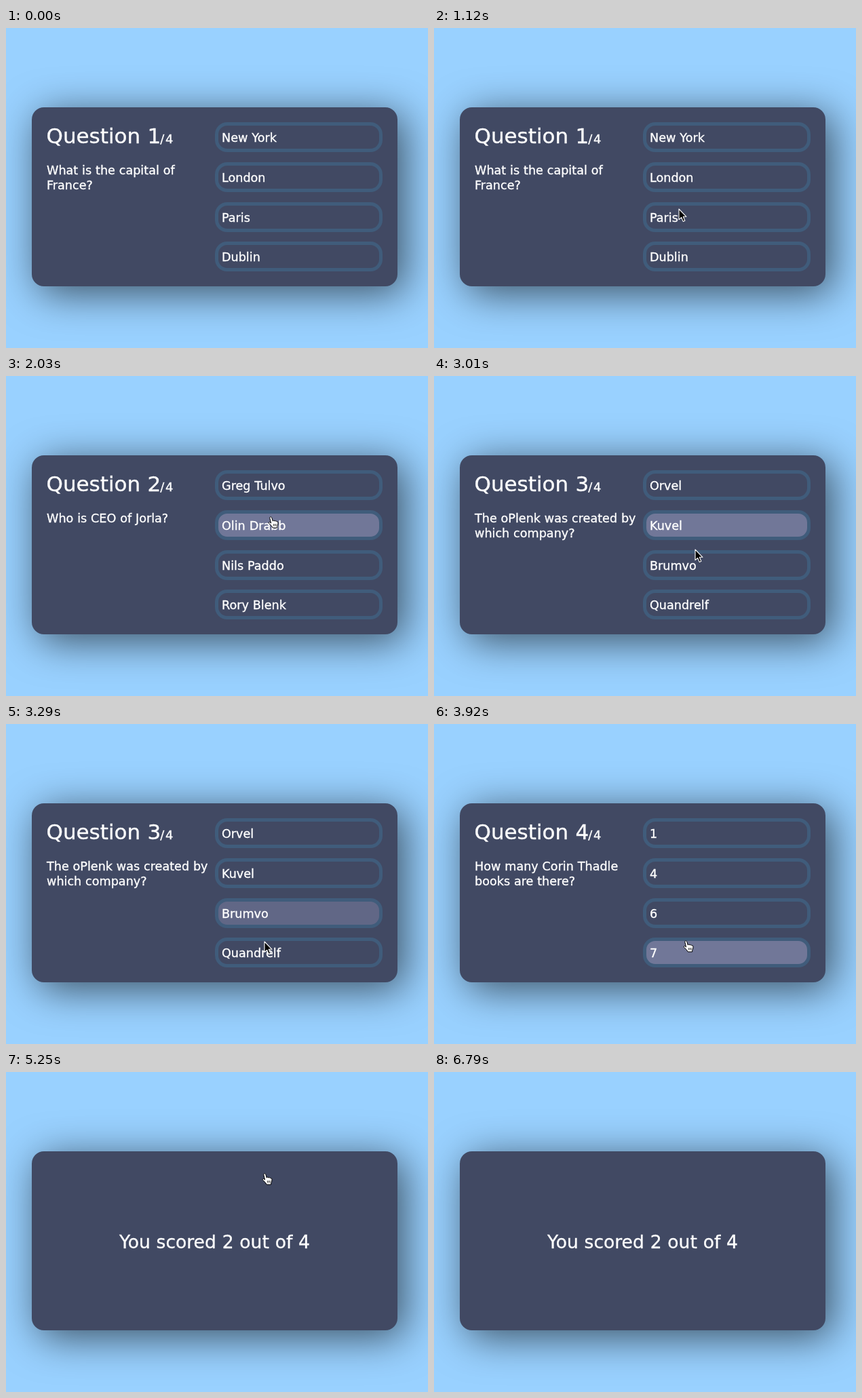
Animation, 622 px wide and 472 px high, one loop 7280 ms. Source, as an HTML page:

```html
<!DOCTYPE html>
<html lang="en">
<head>
<meta charset="utf-8">
<title>Quiz</title>
<style>
  html, body { margin: 0; width: 100%; height: 100%; overflow: hidden; background: #99d1ff; }
  .card {
    position: absolute; left: 38px; top: 117px; width: 539px; height: 264px;
    border-radius: 18px; background: #414963;
    box-shadow: 10px 10px 60px rgba(0, 0, 0, .62);
  }
  svg { position: absolute; left: 0; top: 0; width: 622px; height: 472px; }
  text {
    font: 17.6px "DejaVu Sans", Verdana, sans-serif;
    word-spacing: .015em; fill: #fff; stroke: #fff; stroke-width: .35;
  }
  .title { font-size: 31px; }
  .total { font-size: 18px; }
  .slash { letter-spacing: .1em; }
  .score { font-size: 26.55px; text-anchor: middle; }
  .option { fill: #717798; fill-opacity: 0; stroke: #405c7b; stroke-width: 5; }
  .hand { fill: #fff; stroke: #000; stroke-linejoin: round; }
  .arrow { fill: #000; stroke: #fff; stroke-width: 1.1; stroke-linejoin: round; }
</style>
</head>
<body>
<div class="card"></div>
<svg viewBox="0 0 622 472">
  <g id="quiz">
    <text class="title" x="59.5" y="170">Question <tspan id="number">1</tspan><tspan class="total" dx="-1"><tspan class="slash">/</tspan>4</tspan></text>
    <text id="line0" x="60" y="216"></text>
    <text id="line1" x="60" y="238"></text>
    <g id="options"></g>
  </g>
  <text id="score" class="score" x="307.5" y="260">You scored 2 out of 4</text>
  <g id="cursor">
    <path id="arrow" class="arrow" d="M0 0V15.6L3.6 12.3L6.2 18.4L8.8 17.3L6.3 11.3H11Z"/>
    <g id="hand" class="hand">
      <path d="M-1.2 1.5C-1.5-.6 1.2-.8 1.8 1.2L3.2 6Q4.8 4 6.2 6Q8 5 8.8 6.6Q11 6.5 11 8.4Q11 11 9.8 13.5L9.6 16H3.2Q2 13-2.6 9.2C-3.2 8-2 7-.8 7.8L.6 9Z"/>
      <path d="M4.4 10.2v3.2m1.9-3.2v3.2m1.9-3.2v3.2" stroke-width=".8"/>
    </g>
  </g>
</svg>
<script>
const LOOP = 7280, STEP = 70, SCORE_AT = 4970, LEAVE_AT = 6370, GONE_AT = 6790;
const $ = id => document.getElementById(id);

const questions = [
  { at: 0, lines: ["What is the capital of", "France?"], options: ["New York", "London", "Paris", "Dublin"] },
  { at: 1540, lines: ["Who is CEO of Jorla?", ""], options: ["Greg Tulvo", "Olin Drabb", "Nils Paddo", "Rory Blenk"] },
  { at: 2730, lines: ["The oPlenk was created by", "which company?"], options: ["Orvel", "Kuvel", "Brumvo", "Quandrelf"] },
  { at: 3710, lines: ["How many Corin Thadle", "books are there?"], options: ["1", "4", "6", "7"] }
];

// Pointer moves, each easing out to a resting place
const entry = { x: 338, y: 490 };
const moves = [
  { from: 0, to: 420, x: 284, y: 324 },
  { from: 490, to: 700, x: 296, y: 253 },
  { from: 700, to: 840, x: 350, y: 243 },
  { from: 980, to: 1330, x: 367, y: 280 },
  { from: 1540, to: 2240, x: 392, y: 201 },
  { from: 2240, to: 2450, x: 388, y: 199 },
  { from: 2870, to: 3430, x: 381, y: 329 },
  { from: 3640, to: 3920, x: 371, y: 320 },
  { from: 3920, to: 4200, x: 381, y: 150 },
  { from: 6300, to: GONE_AT, x: 312, y: 480 }
];

const make = (name, attrs) => {
  const el = document.createElementNS("http://www.w3.org/2000/svg", name);
  for (const key in attrs) el.setAttribute(key, attrs[key]);
  return $("options").appendChild(el);
};
const options = [0, 1, 2, 3].map(i => {
  const top = Math.round(139 + 58.8 * i);
  return {
    top,
    box: make("rect", { class: "option", x: 310.5, y: top + 2.5, width: 242, height: 39, rx: 15.5 }),
    label: make("text", { x: 318, y: top + 29 })
  };
});

function pointer(t) {
  let { x, y } = entry;
  for (const m of moves) {
    if (t <= m.from) break;
    const k = Math.min(1, (t - m.from) / (m.to - m.from));
    const ease = 1 - (1 - k) ** 2;
    x += (m.x - x) * ease;
    y += (m.y - y) * ease;
  }
  return { x, y };
}

function hovered(t) {
  const { x, y } = pointer(t);
  return x < 308 || x > 555 ? -1 : options.findIndex(o => y >= o.top && y <= o.top + 44);
}

// Hover fill follows the pointer with a short fade
const glow = (t, i) => [1, 2, 3].filter(n => hovered(t - n * STEP) === i).length / 3;

const show = (id, on) => $(id).setAttribute("visibility", on ? "visible" : "hidden");

function draw(t) {
  const done = t >= SCORE_AT;
  const index = questions.filter(q => q.at <= t).length - 1;
  const q = questions[index];
  show("quiz", !done);
  show("score", done);
  $("number").textContent = index + 1;
  q.lines.forEach((line, i) => $("line" + i).textContent = line);
  options.forEach((o, i) => {
    o.label.textContent = q.options[i];
    o.box.style.fillOpacity = glow(t, i);
  });

  const { x, y } = pointer(t);
  const visible = t >= STEP && t < GONE_AT;
  const hand = done ? t < LEAVE_AT : hovered(t) >= 0 && hovered(t - STEP) >= 0;
  show("hand", visible && hand);
  show("arrow", visible && !hand);
  $("cursor").setAttribute("transform", `translate(${Math.round(x)} ${Math.round(y)})`);
}

const start = performance.now();
function tick() {
  const t = (performance.now() - start) % LOOP;
  draw(Math.floor(t / STEP) * STEP);
  requestAnimationFrame(tick);
}
tick();
</script>
</body>
</html>
```
